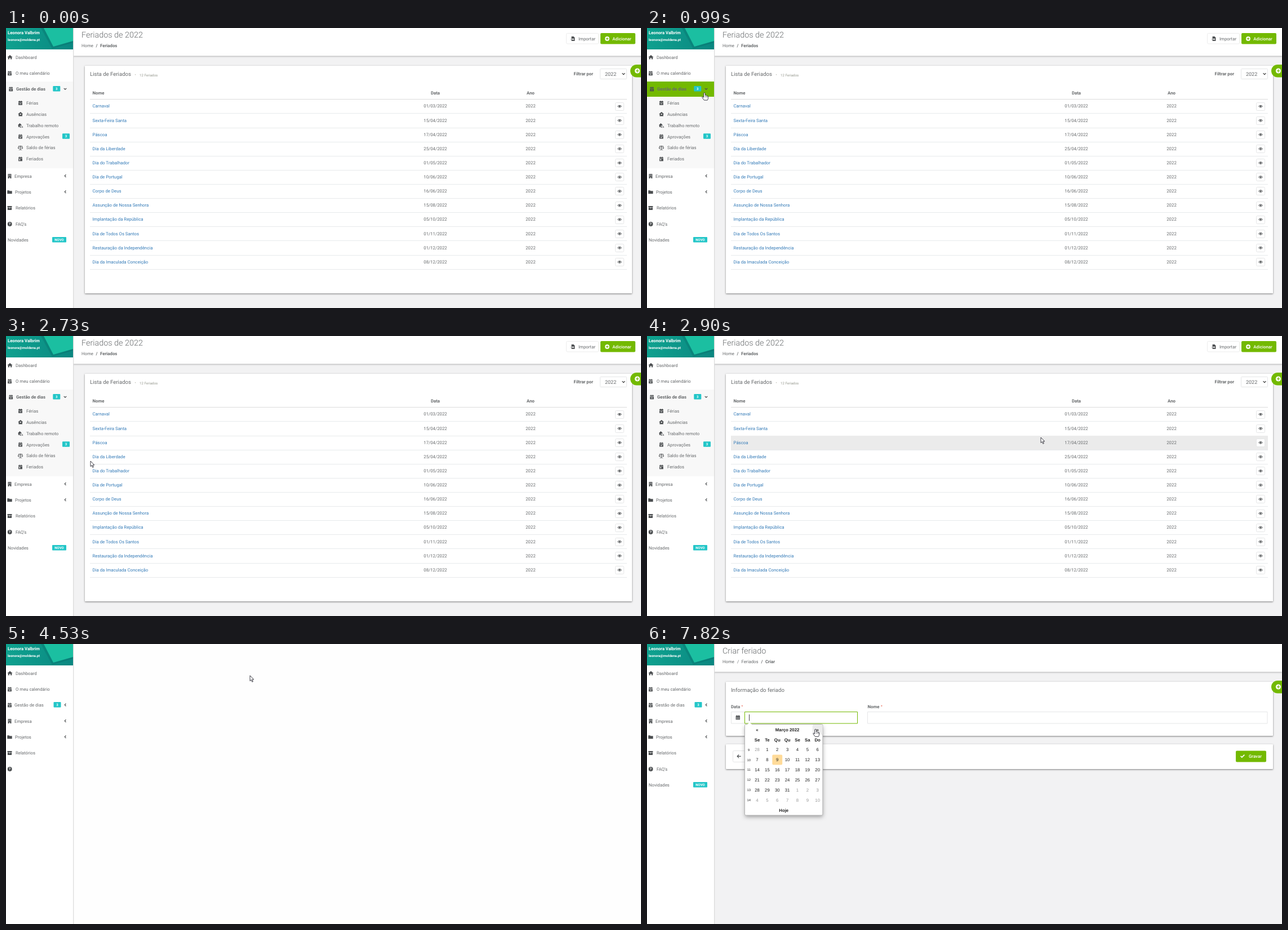
These frames come from a looping animation (1127x497 px, 8000 ms). An HTML page with a canvas:

```html
<!DOCTYPE html>
<html lang="pt">
<head>
<meta charset="utf-8">
<title>Feriados</title>
<style>
html, body { margin: 0; width: 100%; height: 100%; overflow: hidden; background: #fff; }
canvas { display: block; width: 1127px; height: 497px; }
</style>
</head>
<body>
<canvas id="stage"></canvas>
<script>
const W = 1127, H = 497, LOOP = 8000;
const canvas = document.getElementById('stage');
const dpr = window.devicePixelRatio || 1;
canvas.width = W * dpr;
canvas.height = H * dpr;
const ctx = canvas.getContext('2d');
ctx.scale(dpr, dpr);

const ROBOTO = 'Roboto, sans-serif', ARIAL = '"Liberation Sans", Arial, sans-serif';
const INK = '#676a6c', DARK = '#4b4e50', GREEN = '#73b900', TEAL = '#23c6c8', LINE = '#e5e6e7';
const BLANK_AT = 4460, FORM_AT = 4780, FOCUS_AT = 5520, PICKER_AT = 5640;

// Bursts of pointer movement: start, end, steps
const bursts = [
  [370, 1140, 11], [1230, 1380, 3], [1550, 2010, 7], [2180, 2250, 2], [2730, 3530, 11],
  [3620, 3770, 3], [3920, 4700, 11], [4780, 5560, 11], [5950, 6740, 11], [6820, 6880, 2],
  [7280, 7820, 8]
];

// Pointer path: time, x, y
const path = [
  [370, 655, 417], [447, 596, 190], [524, 569, 168], [680, 400, 140], [910, 130, 118],
  [1140, 45, 108], [1380, 56, 115], [1550, 62, 130], [1780, 70, 192], [2010, 72, 220],
  [2250, 70, 228], [2730, 150, 222], [2810, 430, 196], [2890, 699, 180], [3130, 930, 105],
  [3530, 1076, 31], [3770, 1084, 20], [4150, 1084, 20], [4310, 900, 26], [4544, 433, 56],
  [4780, 360, 84], [5170, 300, 118], [5560, 284, 133], [5950, 287, 150], [6190, 283, 180],
  [6430, 268, 181], [6740, 262, 162], [6880, 268, 158], [7280, 275, 157], [7820, 299, 151]
];

const icons = {
  home: 'M-4.6 0L0-4 4.6 0H3.2V3.6H1V1H-1V3.6H-3.2V0Z',
  cal: 'M-3.4-3H3.4V3.7H-3.4ZM-3.4-1.2H3.4V-.5H-3.4ZM-2.1-4.2h1.1v1.2h-1.1zM1-4.2h1.1v1.2H1zM-1.6 1.1h3.2v.8h-3.2z',
  grid: 'M-3.7-3H3.7V3.8H-3.7ZM-2.3-4.2h1.2v1.2h-1.2zM1.1-4.2h1.2v1.2H1.1z' +
    'M-2.8-.8h1.3v1.1h-1.3zM-.65-.8h1.3v1.1h-1.3zM1.5-.8h1.3v1.1H1.5zM-2.8 1.4h1.3v1.1h-1.3zM-.65 1.4h1.3v1.1h-1.3zM1.5 1.4h1.3v1.1H1.5z',
  checked: 'M-3.4-3H3.4V3.7H-3.4ZM-3.4-1.4H3.4V-.8H-3.4ZM-2.1-4.2h1.1v1.2h-1.1zM1-4.2h1.1v1.2H1zM-1.9 1.1l.6-.6 1 .9 2-1.8.6.7-2.6 2.3z',
  dayoff: 'M-3.4-3H3.4V3.7H-3.4ZM-3.4-1.4H3.4V-.8H-3.4ZM-2.1-4.2h1.1v1.2h-1.1zM1-4.2h1.1v1.2H1zM-2.2.2h2v2h-2z',
  away: 'M-4.4-.2L.4-4 4.6-.2H3.4V3.6H-3V-.2ZM-.8-.8h2.2V1h-2.2z',
  remote: 'M-4.6-.4L-1-3.8 2.6-.4H1.6V.3H-1V2.8H-3.6V-.4ZM-.3 1H4V3.6H4.7V4.2H-1V3.6H-.3ZM.5 1.7V3.5H3.3V1.7Z',
  scale: 'M-.5-4H.5V-3.2L3.4-3.4V-2.7L4.7.6Q3.2 2.3 1.6.6L2.9-2.5.5-2.3V3H2.8V3.8H-2.8V3H-.5V-2.3L-2.9-2.5-1.6.6Q-3.2 2.3-4.7.6L-3.4-2.7V-3.4L-.5-3.2Z' +
    'M2.4.3H3.9L3.15-1.6ZM-3.9.3H-2.4L-3.15-1.6Z',
  building: 'M-2.9-4H2.9V4H.8V2H-.8V4H-2.9ZM-1.7-2.9h1.1v1.1h-1.1zM.6-2.9h1.1v1.1H.6zM-1.7-.8h1.1v1.1h-1.1zM.6-.8h1.1v1.1H.6z',
  folder: 'M-4.2-3H-1L0-2H4.2V3H-4.2Z',
  archive: 'M-4-3.5H4V-1.6H-4ZM-3.6-1.1H3.6V3.4H-3.6ZM-1.2-.3H1.2V.5H-1.2Z',
  file: 'M-2.4-4H1.4L3.4-2V4H-2.4V1.6H.2V2.8L2.2.9.2-1V.2H-2.4ZM-3.6.4H-2.4V1.4H-3.6Z',
  back: 'M-3.7 0L-.2-3.4.6-2.6-1.4-.6H3.7V.6H-1.4L.6 2.6-.2 3.4Z',
  tick: 'M-4 .2L-2.8-1-1.2.6 2.8-3.3 4-2.1-1.2 3Z',
  eye: 'M-3.8 0Q0-4.9 3.8 0 0 4.9-3.8 0ZM-2.8 0Q0 3.4 2.8 0 0-3.4-2.8 0ZM-1.3 0A1.3 1.3 0 0 0 1.3 0 1.3 1.3 0 0 0-1.3 0Z'
};
for (const k in icons) icons[k] = new Path2D(icons[k]);

const arrow = new Path2D('M0 0V9.6L2.2 7.6 3.8 11.3 5.4 10.6 3.8 7H6.8Z');
const hand = new Path2D('M-1.3 1Q0-.9 1.3 1V5Q2.9 4 3.3 5.2 4.7 4.6 5 5.8 6.5 5.5 6.5 7V9.8Q6.5 11.8 5.3 13.4H-.5L-3.8 9Q-4.6 7.3-3.1 7.1L-1.3 8.6Z');

function box(x, y, w, h, fill, stroke, r = 0) {
  ctx.beginPath();
  ctx.roundRect(x, y, w, h, r);
  if (fill) { ctx.fillStyle = fill; ctx.fill(); }
  if (stroke) { ctx.strokeStyle = stroke; ctx.lineWidth = 1; ctx.stroke(); }
}

// y is the middle of the capitals
function text(s, x, y, { size = 7.8, color = INK, weight = 400, align = 'left', font = ROBOTO } = {}) {
  ctx.font = `${weight} ${size}px ${font}`;
  ctx.fillStyle = color;
  ctx.textAlign = align;
  ctx.fillText(s, x, y + size * 0.355);
}

function icon(name, x, y, color = DARK) {
  ctx.save();
  ctx.translate(x, y);
  ctx.fillStyle = color;
  ctx.fill(icons[name], 'evenodd');
  ctx.restore();
}

function poly(points, color, width) {
  ctx.beginPath();
  points.forEach(([x, y]) => ctx.lineTo(x, y));
  if (width) { ctx.strokeStyle = color; ctx.lineWidth = width; ctx.stroke(); }
  else { ctx.fillStyle = color; ctx.fill(); }
}

function disc(x, y, r, color) {
  ctx.beginPath();
  ctx.arc(x, y, r, 0, 7);
  ctx.fillStyle = color;
  ctx.fill();
}

function plus(x, y, r) {
  disc(x, y, r, '#fff');
  box(x - r * 0.6, y - 0.6, r * 1.2, 1.2, GREEN);
  box(x - 0.6, y - r * 0.6, 1.2, r * 1.2, GREEN);
}

function shadowBox(x, y, w, h, blur, dy, alpha, r = 0) {
  ctx.save();
  ctx.shadowColor = `rgba(0,0,0,${alpha})`;
  ctx.shadowBlur = blur * dpr;
  ctx.shadowOffsetY = dy * dpr;
  box(x, y, w, h, '#fff', null, r);
  ctx.restore();
}

function badge(s, x, y, w) {
  box(x, y - 4.8, w, 9.5, TEAL, null, 1);
  text(s, x + w / 2, y, { size: 6, weight: 700, color: '#fff', align: 'center' });
}

function tick(t) {
  const b = bursts.filter(([a]) => t >= a).pop();
  if (!b) return 0;
  const [a, end, n] = b, step = (end - a) / (n - 1);
  return a + Math.min(n - 1, Math.floor((t - a) / step + 0.2)) * step;
}

function pointerAt(t) {
  const i = path.findIndex(k => k[0] >= t);
  if (i < 0) return path[path.length - 1].slice(1);
  if (i === 0) return path[0].slice(1);
  const [t0, x0, y0] = path[i - 1], [t1, x1, y1] = path[i];
  const u = (t - t0) / (t1 - t0);
  return [x0 + (x1 - x0) * u, y0 + (y1 - y0) * u];
}

const inside = (p, x, y, w, h) => p && p[0] >= x && p[0] < x + w && p[1] >= y && p[1] < y + h;

function sidebar(t, p) {
  const open = t < BLANK_AT, shift = open ? 126 : 0;
  box(0, 0, 119.5, H, '#fff');
  box(119, 0, 1, H, '#dcdcdc');
  box(120, 0, 1, H, 'rgba(0,0,0,.04)');

  const g = ctx.createLinearGradient(0, 0, 119, 38);
  g.addColorStop(0, '#0fa390');
  g.addColorStop(1, '#0a8680');
  box(0, 0, 119, 38, g);
  poly([[62, 0], [119, 0], [119, 26], [82, 37]], 'rgba(0,70,70,.16)');
  poly([[67, 0], [119, 0], [119, 23], [84, 33]], '#1bbfa1');
  text('Leonora Valbrim', 3, 8, { weight: 700, color: '#fff', size: 7.7 });
  text('leonora@moldena.pt', 3, 20.5, { weight: 700, color: '#fff', size: 6.1 });

  icon('home', 7, 52);
  text('Dashboard', 17, 52);
  icon('cal', 6.5, 80.5);
  text('O meu calendário', 17, 80.5);

  if (open) {
    box(0, 95, 119, 154, '#f8f8f8');
    if (inside(p, 0, 95, 119, 27)) box(0, 95, 119, 27, GREEN);
    icon('cal', 8.7, 108.5);
    text('Gestão de dias', 18, 108.5, { weight: 700 });
    badge('3', 83.3, 107.8, 13);
    poly([[102.8, 107], [105, 109.2], [107.2, 107]], DARK, 1.2);
    const items = [['cal', 'Férias'], ['away', 'Ausências'], ['remote', 'Trabalho remoto'],
      ['checked', 'Aprovações'], ['scale', 'Saldo de férias'], ['dayoff', 'Feriados']];
    items.forEach(([name, label], i) => {
      const y = 133.1 + i * 19.9;
      if (inside(p, 0, y - 10, 119, 19.9)) box(0, Math.round(y - 10), 119, 20, GREEN);
      icon(name, 25.5, y);
      text(label, 36, y);
      if (i === 3) badge('3', 100, y - 0.8, 13);
    });
  } else {
    icon('cal', 6.5, 108.5);
    text('Gestão de dias', 15, 108.5);
    badge('3', 84.5, 107.8, 13);
  }

  const chevron = y => poly([[106.4, y - 2.3], [104.2, y], [106.4, y + 2.3]], DARK, 1.2);
  if (!open) chevron(108);
  [['building', 'Empresa', 15], ['folder', 'Projetos', 16], ['archive', 'Relatórios', 17]].forEach(([name, label, x], i) => {
    const y = 137 + i * 28.3 + shift;
    icon(name, 6.5, y);
    text(label, x, y);
    if (i < 2) chevron(y - 0.5);
  });
  const y = 222 + shift;
  disc(6.7, y, 3.9, DARK);
  text('?', 6.7, y, { size: 6.4, weight: 700, color: '#fff', align: 'center' });
  if (open || t >= FORM_AT) {
    text('FAQ’s', 17, y);
    text('Novidades', 3, y + 28.5);
    badge('NOVO', 82, y + 27.8, 25);
  }
}

function frame(title, crumbs) {
  box(120, 0, W - 120, H, '#f2f2f3');
  shadowBox(120, -5, W - 120, 54.5, 2, 1, 0.22);
  text(title, 134, 11.5, { size: 14.4, weight: 300 });
  crumbs.forEach(([s, x], i) => {
    const last = i === crumbs.length - 1;
    if (i) text('/', x - 7.5, 31.5, { weight: last ? 700 : 400 });
    text(s, x, 31.5, { weight: last ? 700 : 400 });
  });
}

const card = (y, h) => shadowBox(140, y, 971, h, 3, 1, 0.5, 1);

function plusTab() {
  box(1108, 65, 30, 22.5, GREEN, null, 11.2);
  plus(1120.5, 76, 4.6);
}

const holidays = [
  ['Carnaval', '01/03'], ['Sexta-Feira Santa', '15/04'], ['Páscoa', '17/04'],
  ['Dia da Liberdade', '25/04'], ['Dia do Trabalhador', '01/05'], ['Dia de Portugal', '10/06'],
  ['Corpo de Deus', '16/06'], ['Assunção de Nossa Senhora', '15/08'],
  ['Implantação da República', '05/10'], ['Dia de Todos Os Santos', '01/11'],
  ['Restauração da Independência', '01/12'], ['Dia da Imaculada Conceição', '08/12']
];

function listPage(p, trail) {
  frame('Feriados de 2022', [['Home', 134], ['Feriados', 167]]);
  box(994.5, 9.5, 57, 18.5, '#fff', '#ececec', 2);
  icon('file', 1006, 19);
  text('Importar', 1016, 19);
  box(1055, 9, 62, 19.5, inside(p, 1055, 9, 62, 19.5) ? '#66a500' : GREEN, null, 2);
  plus(1067, 19, 3.9);
  text('Adicionar', 1076.3, 19, { weight: 500, color: '#fff' });

  card(67, 404);
  text('Lista de Feriados', 149, 82, { size: 9.6 });
  text('•', 228.5, 83, { size: 6, color: '#9a9a90' });
  text('12 Feriados', 237, 83.3, { size: 6.2, color: '#96998f' });
  text('Filtrar por', 1042, 81.5, { weight: 700, align: 'right' });
  box(1054.5, 72.5, 47, 18, '#fff', LINE, 1);
  text('2022', 1063, 81.5, { size: 9 });
  poly([[1093.6, 80.2], [1096, 82.6], [1098.4, 80.2]], '#333', 1.2);
  plusTab();

  const bold = { weight: 700 }, mid = { align: 'center' };
  text('Nome', 153.5, 115.5, bold);
  text('Data', 762, 115.5, { ...bold, ...mid });
  text('Ano', 931, 115.5, { ...bold, ...mid });
  box(149, 126, 953, 1, '#dcdcdc');
  holidays.forEach(([name, day], i) => {
    const top = 126.4 + i * 25.12, y = top + 12.3;
    if (inside(trail, 149, top, 953, 25.12)) box(149, Math.round(top), 953, 25, '#ebebeb');
    box(149, Math.round(top + 25), 953, 1, '#e7eaec');
    text(name, 153.5, y, { color: '#337ab7' });
    text(day + '/2022', 762, y, mid);
    text('2022', 931, y, mid);
    box(1081.5, Math.round(y - 7) + 0.5, 15, 14, '#fff', LINE, 2);
    icon('eye', 1089, y + 0.4);
  });
}

function picker(p) {
  const cell = 17.86, left = 186.6, top = 143;
  const cx = c => left + (c + 0.5) * cell, cy = r => top + (r + 0.5) * cell;
  const put = (s, x, y, o) => text(s, x, y, { font: ARIAL, color: '#222', align: 'center', ...o });
  shadowBox(174, 143, 138, 161, 7, 3, 0.35, 2);
  box(173.5, 142.5, 138.3, 161.5, '#fff', '#b5b5b5', 2);
  poly([[177.5, 143.2], [182, 139], [186.5, 143.2]], '#fff');

  const col = Math.floor((p[0] - left) / cell), row = Math.floor((p[1] - top) / cell);
  if (row === 0) {
    if (col > 0 && col < 6) box(left + cell, top, cell * 5, cell, '#ececec', null, 2);
    else if (col === 0 || col === 6) box(left + col * cell, top, cell, cell, '#ececec', null, 2);
  } else if (row > 1 && row < 8 && col >= 0 && col < 7) {
    box(left + col * cell, top + row * cell, cell, cell, '#eee', null, 2);
  }

  const bold = { weight: 700 };
  put('«', cx(0), cy(0), bold);
  put('Março 2022', cx(3), cy(0), bold);
  put('»', cx(6), cy(0), bold);
  ['Se', 'Te', 'Qu', 'Qu', 'Se', 'Sa', 'Do'].forEach((d, c) => put(d, cx(c), cy(1), bold));
  box(left + 2 * cell, top + 3 * cell, cell, cell, '#ffdb99', null, 2);
  for (let i = 0; i < 42; i++) {
    const r = 2 + Math.floor(i / 7), other = i === 0 || i > 31;
    if (i % 7 === 0) put(7 + r, 180.7, cy(r), { size: 5.8 });
    put(i === 0 ? 28 : i > 31 ? i - 31 : i, cx(i % 7), cy(r), { color: other ? '#999' : '#222' });
  }
  put('Hoje', 242.7, cy(8), bold);
}

function formPage(t, p) {
  frame('Criar feriado', [['Home', 134], ['Feriados', 167.5], ['Criar', 210]]);
  card(67, 96);
  text('Informação do feriado', 149, 82, { size: 9.6 });
  [['Data', 149, 167.5], ['Nome', 391.5, 415]].forEach(([label, x, star]) => {
    text(label, x, 111.5, { weight: 700 });
    text('*', star, 111, { size: 6.5, color: '#e8604c' });
  });
  box(149.5, 120.5, 24, 20.5, '#fff', LINE);
  icon('grid', 161.3, 130.5);
  box(391.5, 120.5, 709.5, 20.5, '#fff', LINE);
  const focus = t >= FOCUS_AT;
  box(173.5, 120.5, 200, 20.5, '#fff', focus ? GREEN : LINE);

  card(178, 44);
  box(152.5, 189.5, 50, 20, '#fff', LINE, 2);
  icon('back', 163, 199.3);
  text('Voltar', 173, 199.5);
  box(1045, 189.5, 54, 20, GREEN, null, 2);
  icon('tick', 1057, 199.3, '#fff');
  text('Gravar', 1068, 199.5, { weight: 500, color: '#fff' });
  plusTab();

  if (t >= PICKER_AT) picker(p);
  if (focus && Math.floor((t - FOCUS_AT) / 530) % 2 === 0) box(181, 125, 1, 11.5, '#444');
}

function pointer(t, p) {
  const form = t >= FORM_AT;
  const picking = t >= PICKER_AT && inside(p, 174, 143, 138, 161);
  ctx.save();
  ctx.translate(p[0], p[1]);
  if (form && inside(p, 173, 120, 201, 21)) {
    poly([[-2, -6], [2, -6]], '#333', 0.9);
    poly([[0, -6], [0, 6.5]], '#333', 0.9);
    poly([[-2, 6.5], [2, 6.5]], '#333', 0.9);
  } else {
    const link = picking || inside(p, 0, 38, 119, 350) || (t < BLANK_AT && inside(p, 1055, 9, 62, 19.5));
    const shape = link ? hand : arrow;
    ctx.lineJoin = 'round';
    ctx.fillStyle = '#fff';
    ctx.strokeStyle = '#2b2b35';
    ctx.lineWidth = 0.9;
    ctx.fill(shape);
    ctx.stroke(shape);
    if (link) [1.5, 3.4, 5].forEach(x => poly([[x, 6.2], [x, 8.2]], '#2b2b35', 0.6));
  }
  ctx.restore();
}

function draw(t) {
  const now = tick(t);
  const p = now ? pointerAt(now) : null;
  // Row highlight lags one step behind the pointer
  const trail = now ? pointerAt(now - 78) : null;
  ctx.textRendering = 'geometricPrecision';
  box(0, 0, W, H, '#fff');
  if (t < BLANK_AT) listPage(p, trail);
  else if (t < FORM_AT) box(120, 0, W - 120, H, '#fefefe');
  else formPage(t, p);
  sidebar(t, p);
  if (p) pointer(t, p);
}

const start = performance.now();
function loop() {
  draw((performance.now() - start) % LOOP);
  requestAnimationFrame(loop);
}
loop();
</script>
</body>
</html>
```
